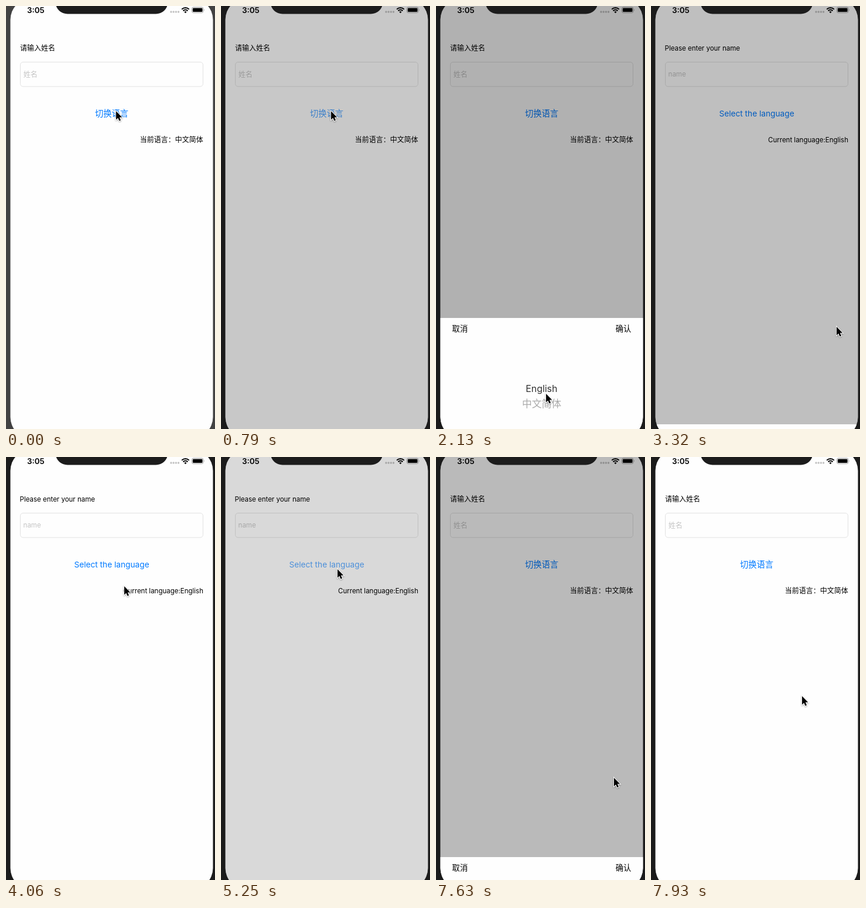
Write an HTML page that moves like this. It is 357 px wide and 720 px high and loops after 8 s.

```html
<!DOCTYPE html>
<html lang="zh-CN">
<head>
<meta charset="utf-8">
<title>Language switch</title>
<style>
  html, body { margin: 0; width: 357px; height: 720px; overflow: hidden; }
  svg { display: block; font-family: Inter, "Noto Sans CJK SC", "Noto Sans CJK", sans-serif; }
  text { fill: #000; white-space: pre; }
  .zh { font-size: 12px; }
  .en { font-size: 11.5px; }
  .english .zh, svg:not(.english) .en { display: none; }
  .hint text { fill: #c4c4c4; }
  #button text { fill: #007aff; text-anchor: middle; }
  #button .zh { font-size: 14.3px; }
  #button .en { font-size: 13.7px; }
  #sheet .zh { font-size: 13.3px; }
  #sheet .en { font-size: 12.9px; }
  .end { text-anchor: end; }
  #rows text { text-anchor: middle; fill: #aaa; }
  #rows text.on { fill: #333; }
  .time { font-size: 13.3px; font-weight: 600; }
</style>
</head>
<body>
<svg id="stage" width="357" height="720" viewBox="0 0 357 720">
  <defs>
    <clipPath id="screen"><rect x="7.5" y="-13.5" width="346" height="750" rx="37"/></clipPath>
    <filter id="shadow" x="-50%" y="-50%" width="200%" height="200%">
      <feDropShadow dx="0" dy="1" stdDeviation="1" flood-opacity=".4"/>
    </filter>
  </defs>
  <rect id="bezel" width="357" height="720"/>

  <g clip-path="url(#screen)">
    <rect width="357" height="720" fill="#fefefe"/>

    <text class="time" x="36" y="11.5">3:05</text>
    <g fill="#c2c2c2">
      <circle cx="282" cy="10" r="1.7"/><circle cx="286.2" cy="10" r="1.7"/>
      <circle cx="290.4" cy="10" r="1.7"/><circle cx="294.6" cy="10" r="1.7"/>
    </g>
    <g fill="none" stroke="#000" stroke-width="1.9">
      <path d="M300.2 5.6a9 9 0 0 1 12.6 0"/>
      <path d="M302.5 8.2a5.7 5.7 0 0 1 8 0"/>
    </g>
    <path d="M304.4 10.1a3 3 0 0 1 4.2 0l-2.1 2.1z"/>
    <rect x="317.5" y="2" width="19.5" height="9.5" rx="2.6" fill="none" stroke="#999" stroke-width=".9"/>
    <rect x="318.9" y="3.4" width="16.7" height="6.7" rx="1.4"/>
    <path d="M338 5.2q1.6 1.5 0 3.1z" fill="#999"/>

    <text class="zh" x="24" y="76.3">请输入姓名</text>
    <text class="en" x="23.6" y="76">Please enter your name</text>

    <rect x="24.5" y="95.5" width="312" height="41.5" rx="4.5" fill="none" stroke="#e2e2e2"/>
    <g class="hint">
      <text class="zh" x="29.7" y="120.5">姓名</text>
      <text class="en" x="29.6" y="120.2">name</text>
    </g>

    <g id="button">
      <text class="zh" x="180.5" y="188.4">切换语言</text>
      <text class="en" x="180.5" y="188.2">Select the language</text>
    </g>

    <text class="zh end" x="336.7" y="232.4">当前语言：中文简体</text>
    <text class="en end" x="337" y="232.2">Current language:English</text>

    <rect id="dim" width="357" height="720"/>

    <g id="sheet">
      <rect y="531" width="357" height="210" fill="#fefefe"/>
      <text class="zh" x="27.6" y="553.9">取消</text>
      <text class="zh end" x="333.3" y="553.9">确认</text>
      <text class="en" x="27.3" y="553.6">Cancel</text>
      <text class="en end" x="334.2" y="553.6">Confirm</text>
      <g id="rows">
        <text x="180.3" y="657" font-size="15.9">English</text>
        <text x="180.5" y="683.2" font-size="16.8">中文简体</text>
      </g>
    </g>
  </g>

  <rect x="85" y="-24" width="191" height="37.5" rx="20" fill="#1c1c1c"/>
  <path id="cursor" d="M0 0V14.5L3.3 11.5L5.5 16.6L8 15.6L5.8 10.6H10.3Z"
        stroke="#fff" stroke-width="1.8" paint-order="stroke" filter="url(#shadow)"/>
</svg>

<script>
  const LOOP = 8000, FIRST = 486, STEP = 148.6;
  const $ = id => document.getElementById(id);

  // Keys are [step, value...]; values run straight between keys.
  const cursorKeys = [
    [8, 188, 179], [10, 188, 641], [11, 188, 641], [12, 188, 660], [13, 188, 669],
    [15, 188, 669], [18, 317, 546], [20, 317, 546], [25, 202, 220], [26, 202, 220],
    [28, 199, 191], [34, 199, 191], [38, 193, 610], [40, 190, 660], [41, 190, 672],
    [43, 190, 646], [46, 304, 546], [49, 304, 546], [51, 258, 407]
  ];
  const dimKeys = [
    [2, 0], [3, .21], [4, .305], [19, .305], [20, .25], [21, 0],
    [32, 0], [33, .145], [34, .305], [48, .305], [49, .27], [50, .1], [51, 0]
  ];
  const sheetKeys = [
    [3, 205], [4, 0], [19, 0], [20, 181], [21, 205],
    [33, 205], [34, 30], [35, 0], [48, 0], [49, 150], [50, 205]
  ];
  const pressKeys = [[1, 1], [2, .3], [3, .7], [4, 1], [30, 1], [31, .3], [32, .3], [33, .65], [34, 1]];
  const scrollKeys = [[41, 0], [43, 26]];

  function at(keys, n) {
    const i = keys.findIndex(k => k[0] >= n);
    if (i === 0) return keys[0].slice(1);
    if (i < 0) return keys[keys.length - 1].slice(1);
    const [a, b] = [keys[i - 1], keys[i]];
    const p = (n - a[0]) / (b[0] - a[0]);
    return a.slice(1).map((v, j) => v + (b[j + 1] - v) * p);
  }

  function move(id, x, y) {
    $(id).setAttribute("transform", `translate(${x} ${y})`);
  }

  function draw() {
    const t = performance.now() % LOOP;
    const n = Math.max(0, Math.floor((t - FIRST) / STEP) + 1);
    const scroll = at(scrollKeys, n)[0];

    $("stage").classList.toggle("english", n >= 20 && n < 49);
    $("bezel").setAttribute("fill", n < 1 ? "#424242" : "#1b1b1b");
    $("dim").setAttribute("opacity", at(dimKeys, n)[0]);
    $("button").setAttribute("opacity", at(pressKeys, n)[0]);
    move("sheet", 0, at(sheetKeys, n)[0]);
    move("rows", 0, -scroll);
    const [english, chinese] = $("rows").children;
    english.classList.toggle("on", scroll < 13);
    chinese.classList.toggle("on", scroll >= 13);
    move("cursor", ...at(cursorKeys, n));
    requestAnimationFrame(draw);
  }
  draw();
</script>
</body>
</html>
```
